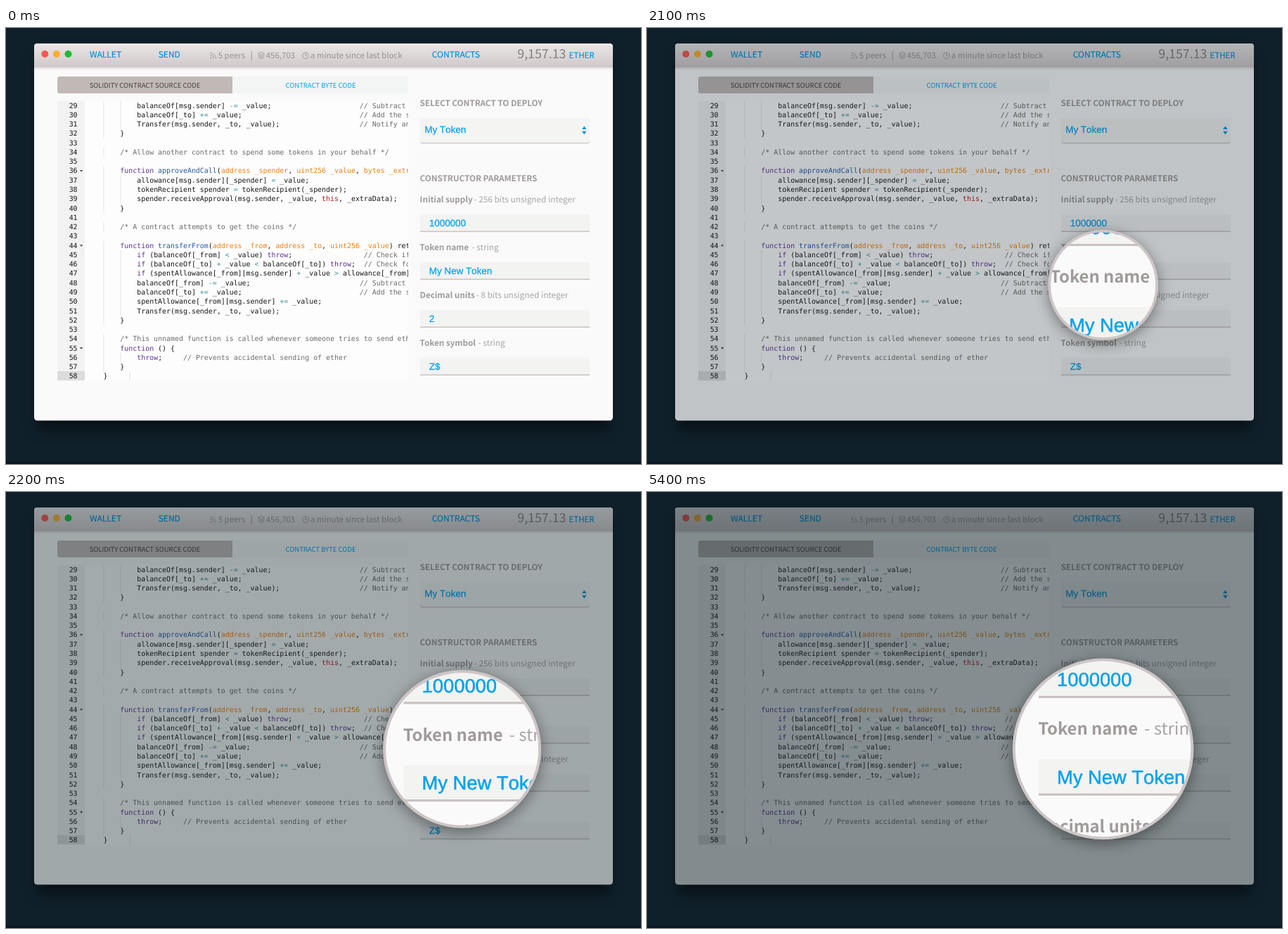
An HTML page that plays this animation: 903 by 620 pixels, repeating every 7.4 s.

```html
<!DOCTYPE html>
<html lang="en">
<head>
<meta charset="utf-8">
<title>Contract deployment</title>
<style>
  html, body { margin: 0; width: 100%; height: 100%; overflow: hidden; background: #10202a; }
  svg { display: block; width: 903px; height: 620px; }
  text { white-space: pre; text-rendering: geometricPrecision; }
  .ui { font-family: "Noto Sans CJK JP", "Noto Sans CJK SC", "Noto Sans CJK", "Open Sans", sans-serif; }
  .value { font: 13.4px "Liberation Sans", Arial, sans-serif; font-kerning: none; fill: #00a0f0; stroke: #00a0f0; stroke-width: .25; }
  .code { font: 9.93px "DejaVu Sans Mono", monospace; fill: #161616; }
  .menu { font-size: 12px; font-weight: 500; fill: #0092dc; stroke: #0092dc; stroke-width: .15; }
  .status { font-size: 11.45px; font-weight: 300; fill: #989293; }
  .tab { font-size: 9.5px; text-anchor: middle; }
  .heading { font-size: 11.7px; font-weight: 600; fill: #a09a9a; }
  .label { font-size: 11.65px; font-weight: 600; fill: #a09a9a; }
  .hint { font-size: 11.8px; font-weight: 300; fill: #aaa5a5; }
  .keyword { fill: #5f3395; }
  .name { fill: #2858a8; }
  .param { fill: #f08010; }
  .comment { fill: #6b6c69; }
  .self { fill: #b81818; }
  .operator { fill: #38909a; }
</style>
</head>
<body>
<svg viewBox="0 0 903 620">
  <defs>
    <linearGradient id="barFill" x2="0" y2="1">
      <stop offset="0" stop-color="#ebe7e7"/>
      <stop offset="1" stop-color="#d0c8c9"/>
    </linearGradient>
    <linearGradient id="barShade" x2="0" y2="1">
      <stop offset="0" stop-color="#d0c8c9" stop-opacity=".55"/>
      <stop offset="1" stop-color="#d0c8c9" stop-opacity="0"/>
    </linearGradient>
    <filter id="blur" x="-50%" y="-50%" width="200%" height="200%">
      <feGaussianBlur stdDeviation="10"/>
    </filter>
    <clipPath id="windowClip"><rect x="40" y="22" width="823" height="536.3" rx="4.5"/></clipPath>
    <clipPath id="codeClip"><rect x="73" y="104" width="499" height="397.5"/></clipPath>
    <clipPath id="lensClip"><circle id="lensHole"/></clipPath>

    <g id="app">
      <g clip-path="url(#windowClip)">
        <rect x="39" y="21" width="825" height="538" fill="#fafafa"/>
        <rect x="39" y="21" width="825" height="35" fill="url(#barFill)"/>
        <rect x="39" y="56" width="825" height="4" fill="url(#barShade)"/>
      </g>
      <circle cx="55.3" cy="37" r="5" fill="#f9564f"/>
      <circle cx="71.9" cy="37" r="5" fill="#fbaf2d"/>
      <circle cx="88.5" cy="37" r="5" fill="#22b935"/>

      <g class="ui">
        <g class="menu">
          <text x="119" y="42.3">WALLET</text>
          <text x="216.7" y="42.3">SEND</text>
          <text x="605.8" y="42.3">CONTRACTS</text>
          <text x="800.5" y="43.3" font-size="11.5">ETHER</text>
        </g>
        <g class="status">
          <text x="301.7" y="43">5 peers</text>
          <text x="369.7" y="43">456,703</text>
          <text x="432.8" y="43">a minute since last block</text>
          <text x="727.3" y="43.2" style="font-size:17.8px;fill:#858080">9,157.13</text>
        </g>
        <g fill="none" stroke="#989293" stroke-width=".9">
          <path d="M290.5 35.5a8 8 0 0 1 8 8M290.5 38.5a5 5 0 0 1 5 5"/>
          <circle cx="291.5" cy="42.5" r=".8"/>
          <path d="M349.2 33v13"/>
          <path d="M363 34.2l4.5 2.4-4.5 2.4-4.5-2.4zM358.5 39l4.5 2.4 4.5-2.4M358.5 41.4l4.5 2.4 4.5-2.4"/>
          <circle cx="426" cy="39.2" r="4.3"/>
          <path d="M426 36.3v3.2h2"/>
        </g>

        <path d="M322 69H76a3 3 0 0 0-3 3v18a3 3 0 0 0 3 3h246z" fill="#c1b9b8"/>
        <path d="M322 69h247a3 3 0 0 1 3 3v18a3 3 0 0 1-3 3H322z" fill="#f4f5f5"/>
        <text class="tab" x="197.5" y="84.5" fill="#484242">SOLIDITY CONTRACT SOURCE CODE</text>
        <text class="tab" x="447.5" y="84.5" fill="#00a0f0">CONTRACT BYTE CODE</text>

        <text class="heading" x="588.5" y="110.8">SELECT CONTRACT TO DEPLOY</text>
        <text class="heading" x="588.5" y="217.8">CONSTRUCTOR PARAMETERS</text>
      </g>

      <rect x="589" y="128" width="241" height="36.3" rx="3" fill="#cbc3c3"/>
      <rect x="589" y="128" width="241" height="34.9" rx="3" fill="#f4f4f3"/>
      <text class="value" x="595.3" y="149.4">My Token</text>
      <path d="M819 144l3.3-4.6 3.3 4.6zM819 146.8l3.3 4.6 3.3-4.6z" fill="#1b93d8"/>
      <g id="fields"></g>

      <g clip-path="url(#codeClip)">
        <rect x="73" y="104" width="499" height="397.5" fill="#fdfdfd"/>
        <rect x="73" y="104" width="39" height="397.5" fill="#f2f2f2"/>
        <rect x="73" y="488" width="39" height="13.5" fill="#dcdcdc"/>
        <path d="M176 488v13.5" stroke="#dedede"/>
        <g class="code" id="code"></g>
      </g>
    </g>
  </defs>

  <rect width="903" height="620" fill="#10202a"/>
  <rect y="617" width="903" height="3" fill="#0b1623"/>
  <rect x="44" y="34" width="815" height="537" rx="6" fill="#000" opacity=".5" filter="url(#blur)"/>
  <use href="#app"/>
  <rect id="dim" x="40" y="22" width="823" height="536.3" rx="4.5" fill="#102329"/>
  <g id="lens">
    <circle id="lensShadow" fill="#000" opacity=".4" filter="url(#blur)"/>
    <g clip-path="url(#lensClip)"><use id="zoomed" href="#app"/></g>
    <circle id="lensRing" fill="none" stroke="#cdc5c6"/>
  </g>
</svg>

<script>
const byId = id => document.getElementById(id);
const escapeText = s => s.replace(/&/g, "&amp;").replace(/</g, "&lt;").replace(/>/g, "&gt;");
const span = (type, s) => `<tspan class="${type}">${escapeText(s)}</tspan>`;

const fields = [
  ["Initial supply", 665.5, "256 bits unsigned integer", "1000000"],
  ["Token name", 662.5, "string", "My New Token"],
  ["Decimal units", 668.5, "8 bits unsigned integer", "2"],
  ["Token symbol", 671.5, "string", "Z$"],
];
byId("fields").innerHTML = fields.map(([label, hintX, hint, value], i) => `
  <g transform="translate(589 ${247.6 + 68 * i})">
    <text class="ui label" x="-.4">${label}</text>
    <text class="ui hint" x="${hintX - 589}">- ${hint}</text>
    <rect y="17.2" width="241" height="25" fill="#f3f3f2"/>
    <rect y="41" width="241" height="1.5" fill="#c9c1c1"/>
    <text class="value" x="12.8" y="34.3">${value}</text>
  </g>`).join("");

const source = `
            balanceOf[msg.sender] -= _value;                     // Subtract from the sender
            balanceOf[_to] += _value;                            // Add the same to the recipient
            Transfer(msg.sender, _to, _value);                   // Notify anyone listening
        }

        /* Allow another contract to spend some tokens in your behalf */

        function approveAndCall(address _spender, uint256 _value, bytes _extraData) {
            allowance[msg.sender][_spender] = _value;
            tokenRecipient spender = tokenRecipient(_spender);
            spender.receiveApproval(msg.sender, _value, this, _extraData);
        }

        /* A contract attempts to get the coins */

        function transferFrom(address _from, address _to, uint256 _value) returns (bool success) {
            if (balanceOf[_from] < _value) throw;                 // Check if the sender has enough
            if (balanceOf[_to] + _value < balanceOf[_to]) throw;  // Check for overflows
            if (spentAllowance[_from][msg.sender] + _value > allowance[_from][msg.sender]) throw;
            balanceOf[_from] -= _value;                          // Subtract from the sender
            balanceOf[_to] += _value;                            // Add the same to the recipient
            spentAllowance[_from][msg.sender] += _value;
            Transfer(msg.sender, _to, _value);
        }

        /* This unnamed function is called whenever someone tries to send ether */
        function () {
            throw;     // Prevents accidental sending of ether
        }
    }`.slice(1).split("\n");

const FIRST_LINE = 29, LINE_HEIGHT = 13.27, CODE_X = 114.5, CHAR_WIDTH = 5.98;

function highlight(line) {
  const signature = line.match(/^(function) (\w+)\((.*?)\)(.*)$/);
  if (signature) {
    const [, keyword, name, params, rest] = signature;
    const list = params.split(", ").map(p => span("param", p)).join(", ");
    return `${span("keyword", keyword)} ${span("name", name)}(${list})${highlight(rest)}`;
  }
  const token = /(\/\/.*|\/\*.*)|\b(function|if|throw)\b|\b(this)\b|([-+]?=|[<>+])|[^]/g;
  return line.replace(token, (s, comment, keyword, self, operator) =>
    comment ? span("comment", s) : keyword ? span("keyword", s) :
    self ? span("self", s) : operator ? span("operator", s) : escapeText(s));
}

byId("code").innerHTML = source.map((line, i) => {
  const y = 113.6 + LINE_HEIGHT * i;
  const body = line.trimStart();
  const indent = line.length - body.length;
  let guides = "";
  for (let col = 4; col < indent; col += 4) {
    guides += `<path d="M${CODE_X + col * CHAR_WIDTH + .5} ${y - 10}v13.3" stroke="#e2e2e2"/>`;
  }
  const fold = /^function/.test(body) ? `<path d="M104.8 ${y - 4.5}h4.6l-2.3 2.8z" fill="#555"/>` : "";
  return `${guides}${fold}<text x="101.6" y="${y}" text-anchor="end">${FIRST_LINE + i}</text>
    <text x="${CODE_X + indent * CHAR_WIDTH}" y="${y}">${highlight(body)}</text>`;
}).join("");

const LOOP = 7400, ZOOM_START = 2000, STEP = 100, ZOOM = 2.04;
// drift is how far the magnified view still lies from its resting place
const poses = [
  { radius: 26, drift: 34.5, dim: .055, opacity: .9 },
  { radius: 78.5, drift: 17, dim: .25, opacity: 1 },
  { radius: 112.5, drift: 8.5, dim: .38, opacity: 1 },
  { radius: 153.3, drift: 0, dim: .46, opacity: 1 },
  { radius: 128.8, drift: 0, dim: .51, opacity: 1 },
];

function setCircle(id, cx, cy, r) {
  const circle = byId(id);
  circle.setAttribute("cx", cx);
  circle.setAttribute("cy", cy);
  circle.setAttribute("r", r);
}

function render(time) {
  const step = Math.floor((time % LOOP - ZOOM_START) / STEP);
  const pose = poses[Math.min(step, poses.length - 1)];
  byId("lens").style.display = pose ? "" : "none";
  byId("dim").setAttribute("opacity", pose ? pose.dim : 0);
  if (!pose) return;

  const { radius, drift, opacity } = pose;
  const x = 648.6, y = 365.4;
  const ring = Math.min(4, radius / 20);
  setCircle("lensHole", x, y, radius - ring / 2);
  setCircle("lensRing", x, y, radius - ring / 2);
  setCircle("lensShadow", x, y + 5, radius);
  byId("lensRing").setAttribute("stroke-width", ring);
  byId("lens").setAttribute("opacity", opacity);
  byId("zoomed").setAttribute("transform",
    `translate(${557 + drift} ${405 + drift}) scale(${ZOOM}) translate(-589 -345)`);
}

const start = performance.now();
function tick() {
  render(performance.now() - start);
  requestAnimationFrame(tick);
}
tick();
</script>
</body>
</html>
```
